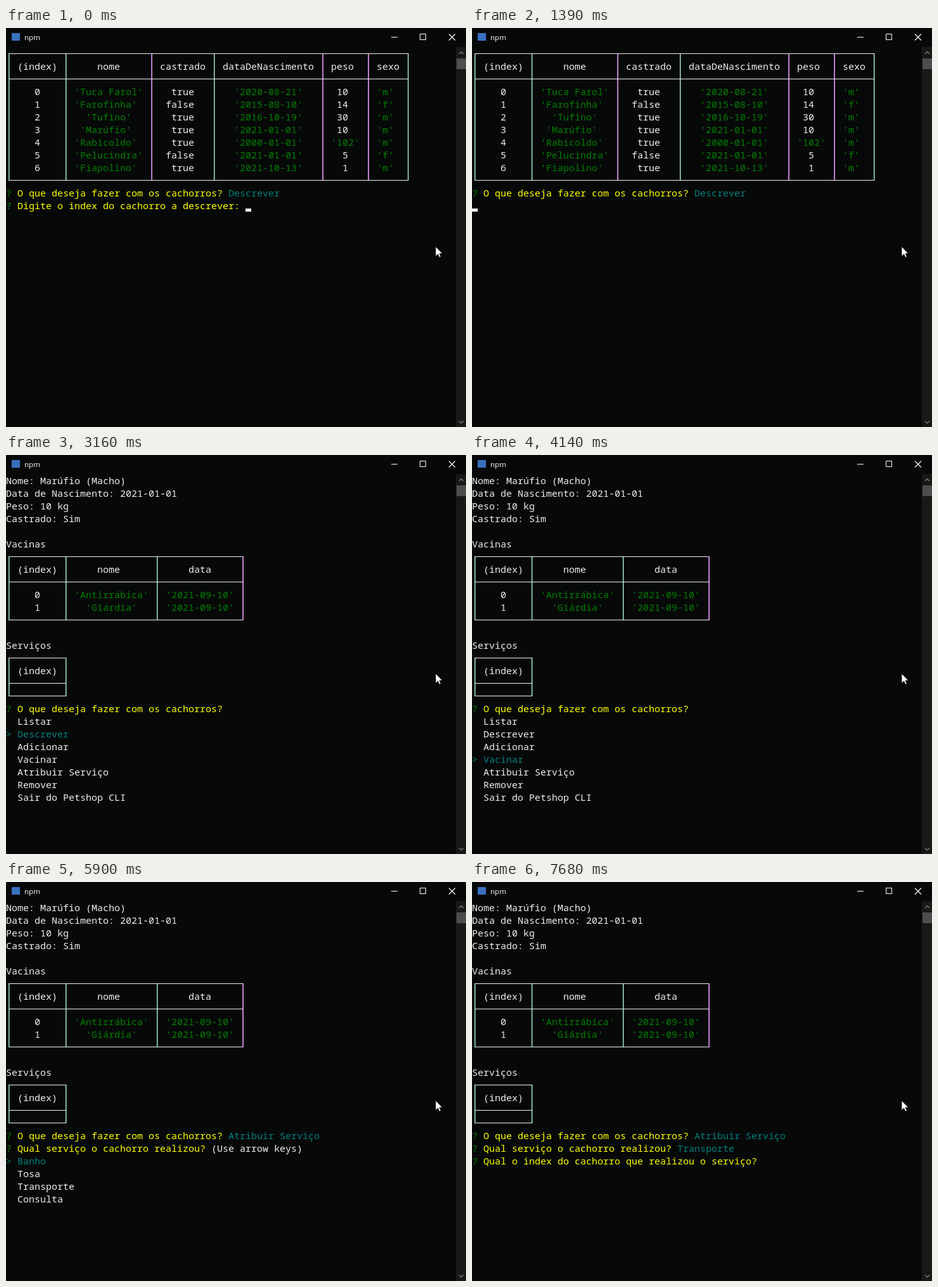
These frames come from a looping animation (726x630 px, 8 s). An HTML page:

```html
<!DOCTYPE html>
<html lang="pt">
<head>
<meta charset="utf-8">
<title>npm</title>
<style>
  html, body { margin: 0; width: 100%; height: 100%; overflow: hidden; background: #070908; }
  svg { display: block; width: 726px; height: 630px; }
  text { white-space: pre; font: 15px "Noto Sans Mono", "DejaVu Sans Mono", monospace; }
  .title { font: 11.6px "Open Sans", "Noto Sans", sans-serif; }
  rect { shape-rendering: crispEdges; }
</style>
</head>
<body>
<svg viewBox="0 0 726 630">
  <rect width="726" height="630" fill="#070908"/>
  <rect x="9" y="8" width="13" height="12" fill="#3a70c0"/>
  <text class="title" x="29" y="19" fill="#fff">npm</text>
  <rect x="608" y="14" width="10" height="1" fill="#fff"/>
  <g fill="none" stroke="#fff">
    <path d="M653.5 9.5h9v9h-9z"/>
    <path d="M699 9.5l10 10M709 9.5l-10 10" stroke-width="1.1"/>
  </g>

  <g id="screen"></g>

  <rect x="710" y="30" width="16" height="600" fill="#191817"/>
  <rect x="711" y="48" width="15" height="17" fill="#4d4d4d"/>
  <path d="M715 41l3.5 -3.5l3.5 3.5M715 620.5l3.5 3.5l3.5 -3.5" fill="none" stroke="#767676" stroke-width="1.5"/>
  <path d="M678 345v15.5l3.6 -3.4l2.4 5.2l2.4 -1l-2.3 -5.2h4.6z" fill="#fff" stroke="#000" stroke-width=".8"/>
</svg>

<script>
const CELL = 9, ROW = 20, TOP = 30, LOOP = 8000;
const WHITE = '#eeedf0', GREEN = '#008000', YELLOW = '#ffff00', CYAN = '#008080';

const rect = (x, y, w, h, fill) =>
  `<rect x="${x}" y="${y}" width="${w}" height="${h}" fill="${fill}"/>`;

const text = (col, row, str, fill = WHITE) =>
  `<text x="${col * CELL}" y="${TOP + row * ROW + 16}" fill="${fill}">${str.replace('>', '&gt;')}</text>`;

const cursor = (col, row) => rect(col * CELL, TOP + row * ROW + 15, 9, 5, WHITE);

// Strings are quoted and green, other values stay plain.
const show = v => typeof v === 'string' ? `'${v}'` : String(v);

function table(row, heads, data) {
  const rows = data.map((r, i) => [i, ...r]);
  const heading = ['(index)', ...heads];
  const widths = heading.map((h, c) =>
    2 + Math.max(h.length, ...rows.map(r => show(r[c]).length)));
  const edges = [0];
  widths.forEach((w, c) => edges.push(edges[c] + w + 1));

  const put = (c, r, str, fill) =>
    text(edges[c] + 1 + Math.floor((widths[c] - str.length) / 2), r, str, fill);
  const mid = r => TOP + r * ROW + 10;
  const end = row + 3 + Math.max(rows.length, 0);
  const height = mid(end) - mid(row) + 1;
  let out = '';

  // Subpixel fringes depend on the parity of the column.
  for (const e of edges) {
    const [a, b] = e % 2 ? ['#a070e8', '#d890b0'] : ['#a8f0d4', '#4a6a50'];
    out += rect(e * CELL + 4, mid(row), 1, height, a) + rect(e * CELL + 5, mid(row), 1, height, b);
  }
  for (const r of [row, row + 2, end])
    out += rect(4, mid(r), edges[edges.length - 1] * CELL + 1, 1, WHITE);

  heading.forEach((h, c) => out += put(c, row + 1, h));
  rows.forEach((r, i) => r.forEach((v, c) =>
    out += put(c, row + 3 + i, show(v), typeof v === 'string' ? GREEN : WHITE)));
  return out;
}

const prompt = (row, question, answer = '', fill = CYAN) =>
  text(0, row, '?', GREEN) + text(2, row, question, YELLOW) +
  text(question.length + 3, row, answer, fill);

const menu = (row, items, chosen) => items.map((item, i) =>
  i === chosen ? text(0, row + i, '> ' + item, CYAN) : text(2, row + i, item)).join('');

const ACTION = 'O que deseja fazer com os cachorros?';
const SERVICE = 'Qual serviço o cachorro realizou?';
const HINT = '(Use arrow keys)';
const actions = ['Listar', 'Descrever', 'Adicionar', 'Vacinar', 'Atribuir Serviço', 'Remover', 'Sair do Petshop CLI'];
const services = ['Banho', 'Tosa', 'Transporte', 'Consulta'];

const list = table(0, ['nome', 'castrado', 'dataDeNascimento', 'peso', 'sexo'], [
  ['Tuca Farol', true, '2020-08-21', 10, 'm'],
  ['Farofinha', false, '2015-08-10', 14, 'f'],
  ['Tufino', true, '2016-10-19', 30, 'm'],
  ['Marúfio', true, '2021-01-01', 10, 'm'],
  ['Rabicoldo', true, '2000-01-01', '102', 'm'],
  ['Pelucindra', false, '2021-01-01', 5, 'f'],
  ['Fiapolino', true, '2021-10-13', 1, 'm'],
]) + prompt(11, ACTION, 'Descrever');

const askIndex = list + prompt(12, 'Digite o index do cachorro a descrever:');

const details = [
  'Nome: Marúfio (Macho)', 'Data de Nascimento: 2021-01-01', 'Peso: 10 kg', 'Castrado: Sim', '', 'Vacinas',
].map((line, i) => text(0, i, line)).join('') +
  table(6, ['nome', 'data'], [['Antirrábica', '2021-09-10'], ['Giárdia', '2021-09-10']]) +
  text(0, 13, 'Serviços') + table(14, [], []);

const pickAction = (i, hint) => details + prompt(18, ACTION, hint, WHITE) + menu(19, actions, i);
const assign = details + prompt(18, ACTION, 'Atribuir Serviço');
const pickService = (i, hint) => assign + prompt(19, SERVICE, hint, WHITE) + menu(20, services, i);

const steps = [
  [0, askIndex + cursor(42, 12)],
  [390, askIndex],
  [830, askIndex + text(42, 12, '3')],
  [1390, list + cursor(0, 12)],
  [1510, pickAction(0, HINT)],
  [3160, pickAction(1)],
  [3460, pickAction(2)],
  [4140, pickAction(3)],
  [4440, pickAction(4)],
  [5900, pickService(0, HINT)],
  [6640, pickService(1)],
  [6940, pickService(2)],
  [7680, assign + prompt(19, SERVICE, 'Transporte') +
    prompt(20, 'Qual o index do cachorro que realizou o serviço?')],
];

const screenBox = document.getElementById('screen');
let shown = -1;

function draw() {
  const t = performance.now() % LOOP;
  const now = steps.filter(s => s[0] <= t).length - 1;
  if (now !== shown) screenBox.innerHTML = steps[shown = now][1];
  requestAnimationFrame(draw);
}
draw();
</script>
</body>
</html>
```
